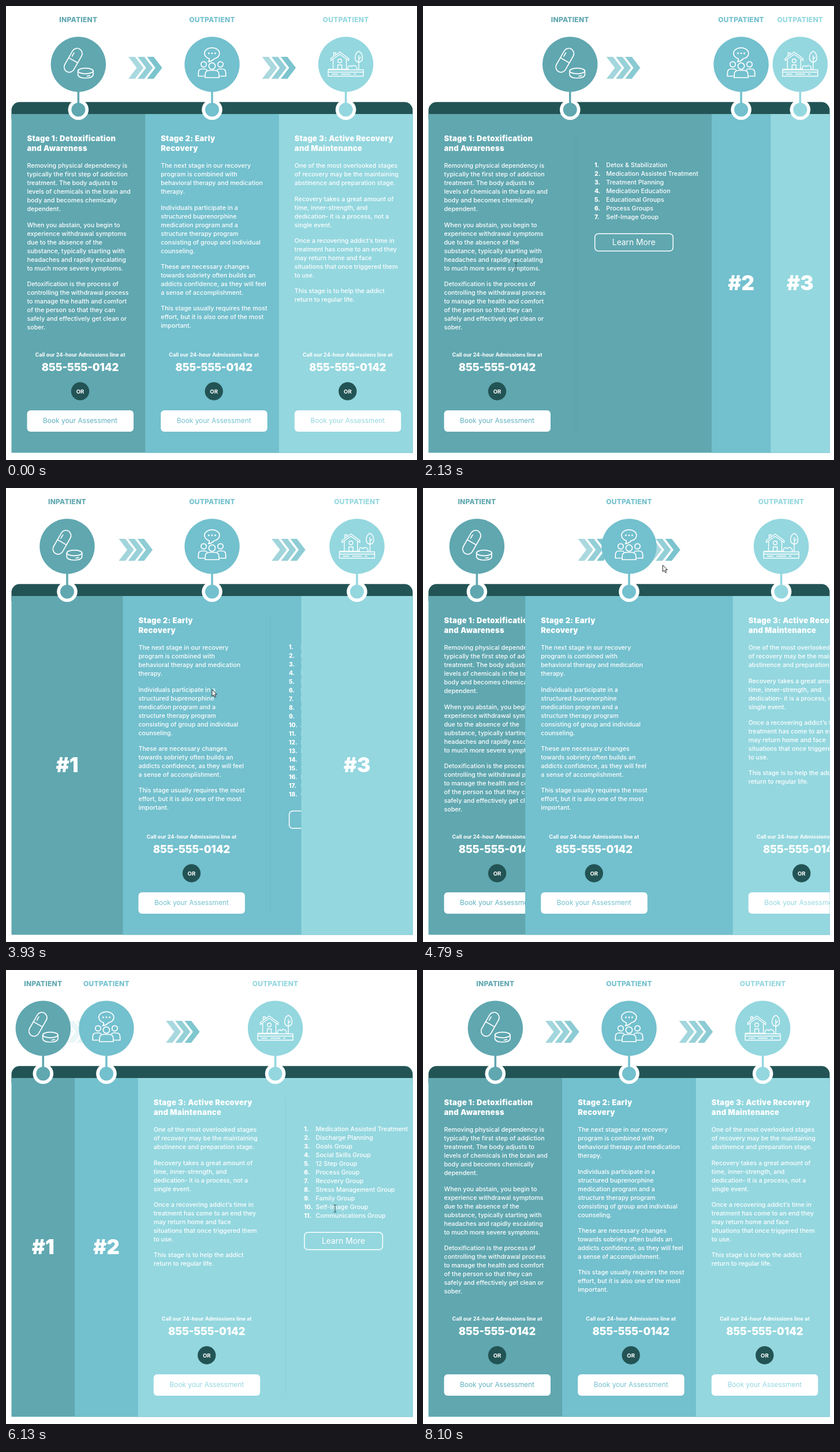
An HTML page with a canvas that plays this animation: 712 by 786 pixels, repeating every 8180 ms.

```html
<!DOCTYPE html>
<html lang="en">
<head>
<meta charset="utf-8">
<title>Recovery stages</title>
<style>
html, body { margin: 0; width: 100%; height: 100%; overflow: hidden; background: #fff; }
canvas { display: block; width: 712px; height: 786px; }
</style>
</head>
<body>
<canvas id="stage"></canvas>
<script>
const LOOP = 8180, LEFT = 9.5, WIDTH = 695, TOP = 187, BOTTOM = 773.5;
const DARK = '#235455', WHITE = '#fff', CHEVRON = '#76c2cc';
const FONT = 'Inter, "Open Sans", sans-serif';
const PHONE = '855-555-0142';

const columns = [
  {
    label: 'INPATIENT', color: '#60a7b0', link: '#60b1bf', icon: drawPills,
    title: ['Stage 1: Detoxification', 'and Awareness'],
    text: [
      ['Removing physical dependency is', 'typically the first step of addiction', 'treatment. The body adjusts to',
        'levels of chemicals in the brain and', 'body and becomes chemically', 'dependent.'],
      ['When you abstain, you begin to', 'experience withdrawal symptoms', 'due to the absence of the',
        'substance, typically starting with', 'headaches and rapidly escalating', 'to much more severe symptoms.'],
      ['Detoxification is the process of', 'controlling the withdrawal process', 'to manage the health and comfort',
        'of the person so that they can', 'safely and effectively get clean or', 'sober.']
    ],
    list: ['Detox & Stabilization', 'Medication Assisted Treatment', 'Treatment Planning', 'Medication Education',
      'Educational Groups', 'Process Groups', 'Self-Image Group']
  },
  {
    label: 'OUTPATIENT', color: '#73c0ce', link: '#73c0ce', icon: drawGroup,
    title: ['Stage 2: Early', 'Recovery'],
    text: [
      ['The next stage in our recovery', 'program is combined with', 'behavioral therapy and medication', 'therapy.'],
      ['Individuals participate in a', 'structured buprenorphine', 'medication program and a',
        'structure therapy program', 'consisting of group and individual', 'counseling.'],
      ['These are necessary changes', 'towards sobriety often builds an', 'addicts confidence, as they will feel',
        'a sense of accomplishment.'],
      ['This stage usually requires the most', 'effort, but it is also one of the most', 'important.']
    ],
    list: ['Medication Assisted Treatment', 'Individual Therapy', 'Treatment Planning', 'Medication Education',
      'Educational Groups', 'Process Group', 'Relapse Prevention', 'Coping Skills Group', 'Social Skills Group',
      'Anger Management', 'Stress Management Group', 'Family Group', 'Life Skills Group', 'Self-Image Group',
      '12 Step Group', 'Recovery Group', 'Goals Group', 'Communications Group']
  },
  {
    label: 'OUTPATIENT', color: '#94d7df', link: '#94d7df', icon: drawHouse,
    title: ['Stage 3: Active Recovery', 'and Maintenance'],
    text: [
      ['One of the most overlooked stages', 'of recovery may be the maintaining', 'abstinence and preparation stage.'],
      ['Recovery takes a great amount of', 'time, inner-strength, and', 'dedication- it is a process, not a', 'single event.'],
      ['Once a recovering addict\u2019s time in', 'treatment has come to an end they', 'may return home and face',
        'situations that once triggered them', 'to use.'],
      ['This stage is to help the addict', 'return to regular life.']
    ],
    list: ['Medication Assisted Treatment', 'Discharge Planning', 'Goals Group', 'Social Skills Group',
      '12 Step Group', 'Process Group', 'Recovery Group', 'Stress Management Group', 'Family Group',
      'Self-Image Group', 'Communications Group']
  }
];

// Open column (0 = none), with the start and the lengths of both transitions
const changes = [
  { at: -2000, open: 0 }, { at: 850, open: 1 }, { at: 2650, open: 0 }, { at: 3818, open: 2 },
  { at: 4625, open: 0 }, { at: 5736, open: 3 }, { at: 7700, open: 0, grow: 330, slide: 370 }
];
const arrowShift = [[0, 0], [-153, 0], [153, -153], [0, 153]];
const arrowAlpha = [[1, 1], [1, 0], [1, 1], [0, 1]];

// Pointer path: time, x, y
const pointer = [
  [860, 12, 300], [1150, 90, 390], [1700, 142, 440], [2130, 161, 451], [2510, 152, 400], [2650, 172, 170],
  [2970, 244, 55], [3400, 300, 70], [3800, 350, 190], [3930, 357, 349], [4400, 362, 372], [4620, 395, 165],
  [5000, 440, 95], [5330, 447, 91], [5500, 462, 110], [5730, 530, 200], [6130, 570, 413], [6600, 578, 425],
  [7000, 600, 480], [7350, 630, 300], [7690, 618, 80], [7800, 614, 6]
];

const canvas = document.getElementById('stage');
const ctx = canvas.getContext('2d');
const ratio = window.devicePixelRatio || 1;
canvas.width = 712 * ratio;
canvas.height = 786 * ratio;

const mix = (a, b, k) => a + (b - a) * k;
const clamp = v => Math.min(1, Math.max(0, v));

// CSS "ease": cubic-bezier(.25, .1, .25, 1)
function ease(x) {
  if (x <= 0 || x >= 1) return clamp(x);
  const curve = (a, b, s) => 3 * a * s * (1 - s) ** 2 + 3 * b * s * s * (1 - s) + s ** 3;
  let lo = 0, hi = 1;
  for (let i = 0; i < 24; i++) {
    const mid = (lo + hi) / 2;
    if (curve(.25, .25, mid) < x) lo = mid; else hi = mid;
  }
  return curve(.1, 1, lo);
}

function write(str, x, y, size, weight, color = WHITE, align = 'left', spacing = 0) {
  ctx.font = `${weight} ${size}px ${FONT}`;
  ctx.letterSpacing = spacing + 'px';
  ctx.textAlign = align;
  ctx.fillStyle = color;
  ctx.fillText(str, x, y);
}

function disc(x, y, r, color) {
  ctx.fillStyle = color;
  ctx.beginPath();
  ctx.arc(x, y, r, 0, Math.PI * 2);
  ctx.fill();
}

function box(x, y, w, h, r) {
  ctx.beginPath();
  ctx.roundRect(x, y, w, h, r);
}

function ring(x, y, rx, ry = rx) {
  ctx.beginPath();
  ctx.ellipse(x, y, rx, ry, 0, 0, Math.PI * 2);
  ctx.stroke();
}

const line = path => ctx.stroke(new Path2D(path));

function drawPills() {
  ctx.save();
  ctx.translate(-9, -7);
  ctx.rotate(.52);
  box(-9, -22.5, 18, 45, 9);
  ctx.stroke();
  line('M-9 0H9M-5 -12V-5');
  ctx.restore();
  ring(12.5, 11.5, 13.2, 4.8);
  line('M-.7 11.5V18.5C1 25.5 24 25.5 25.7 18.5V11.5M15 20.5L20 19.3');
}

function drawGroup() {
  line('M-5 -10A13 9.7 0 1 1 4 -9.8Q0 -5.5 -6.5 -4.3Q-4 -7 -5 -10Z');
  for (const x of [-5.5, 0, 5.5]) disc(x, -19, 1.4, WHITE);
  ring(0, 3, 5.6);
  line('M-12 23V18Q-12 10.5 -5 10.5H5Q12 10.5 12 18V23Z');
  for (const side of [-1, 1]) {
    ctx.save();
    ctx.scale(side, 1);
    ring(14.5, 0, 4.7);
    line('M14 20.5H23.7V14.5Q23.7 8 17 8H13Q10.5 8 9 9.5');
    ctx.restore();
  }
}

function drawHouse() {
  ctx.lineWidth = 1.4;
  line('M-26 -10L-10.5 -21.5L5 -10V-6.5L-10.5 -17.5L-26 -6.5ZM-22 -8.5V8.5M1 -8.5V8.5M-21 -14V-20H-17.5V-16.5');
  ring(-10.5, -6, 3.3);
  line('M-14 8.5V1H-7V8.5M-30 8.5H4');
  line('M4 8.5C3 2 8 1 10 4C14 0 20 3 19 8.5');
  line('M22.5 -22.5C29 -20 33 -6 22.5 -3.5C12 -6 16 -20 22.5 -22.5ZM22.5 -15V8.5M22.5 -9L26 -12.5');
  ctx.strokeRect(-30.5, 9.5, 61, 11);
  line('M-30 13.5H30M-24 17H-14M-8 17H8M14 17H17');
}

function drawChevrons(cx, alpha, t) {
  const glow = .5 + .5 * Math.cos(t / 1200 * Math.PI * 2);
  ctx.save();
  ctx.translate(cx - 29.2, 88);
  ctx.fillStyle = CHEVRON;
  [-.1, .06, .24].forEach((gain, i) => {
    ctx.globalAlpha = alpha * (.72 + gain * glow);
    ctx.fill(new Path2D('M0 0H11.5L26.2 19L11.5 38H0L14.5 19Z'));
    ctx.translate(16.2, 0);
  });
  ctx.restore();
}

function drawHead(col, cx) {
  disc(cx, 101, 47.7, col.color);
  disc(cx, 179.5, 17.8, WHITE);
  ctx.fillStyle = col.color;
  ctx.fillRect(cx - 1.8, 146, 3.6, 24);
  disc(cx, 179.5, 12, col.color);
  write(col.label, cx, 28.4, 12, 800, col.color, 'center', .25);
  ctx.save();
  ctx.translate(cx, 101);
  ctx.strokeStyle = WHITE;
  ctx.lineWidth = 1.7;
  ctx.lineJoin = ctx.lineCap = 'round';
  col.icon();
  ctx.restore();
}

function drawCopy(col, left) {
  const x = left + 27, mid = left + 119;
  col.title.forEach((row, i) => write(row, x, 234 + i * 17, 13, 900, WHITE, 'left', .3));
  let y = 280.2;
  for (const block of col.text) {
    for (const row of block) {
      write(row, x, y, 10.7, 500);
      y += 15;
    }
    y += 12.3;
  }
  write('Call our 24-hour Admissions line at', mid, 607.3, 9.1, 700, WHITE, 'center');
  write(PHONE, mid, 631.8, 18.1, 900, WHITE, 'center');
  disc(mid, 667, 15.7, DARK);
  write('OR', mid, 670.5, 9.6, 700, WHITE, 'center');
  ctx.fillStyle = WHITE;
  box(x, 700, 184.5, 37, 6);
  ctx.fill();
  write('Book your Assessment', mid, 722.3, 11.9, 400, col.link, 'center');
}

function drawList(col, left) {
  const x = left + 287.5;
  ctx.fillStyle = 'rgba(20, 80, 90, .06)';
  ctx.fillRect(left + 255, 220, 1, 517);
  col.list.forEach((item, i) => {
    const y = 279 + i * 15;
    write(i + 1 + '.', x, y, 10.4, 800);
    write(item, x + 20.3, y, 10.75, 500);
  });
  const top = 304.2 + (col.list.length - 1) * 15;
  ctx.strokeStyle = WHITE;
  ctx.lineWidth = 1.5;
  box(x + .7, top, 135.5, 30, 6);
  ctx.stroke();
  write('Learn More', x + 68.3, top + 20, 13.8, 400, WHITE, 'center');
}

function drawPointer(t, beamReady) {
  const i = pointer.findIndex(p => p[0] > t);
  if (i < 1) return;
  const [a, b] = [pointer[i - 1], pointer[i]];
  const k = (t - a[0]) / (b[0] - a[0]);
  const y = mix(a[2], b[2], k);
  ctx.save();
  ctx.translate(mix(a[1], b[1], k), y);
  ctx.lineWidth = 1;
  if (beamReady && y > 215) {
    ctx.strokeStyle = '#35565a';
    line('M-2.5 -6H2.5M0 -6V6M-2.5 6H2.5');
  } else {
    ctx.strokeStyle = '#222';
    ctx.fillStyle = WHITE;
    const shape = new Path2D('M0 0V11.5L2.7 9L4.6 13.2L6.5 12.4L4.7 8.2H8.2Z');
    ctx.fill(shape);
    ctx.stroke(shape);
  }
  ctx.restore();
}

function columnWidth(open, i) {
  if (!open) return WIDTH / 3;
  return open === i + 1 ? 490.5 : 102.25;
}

function draw(t) {
  ctx.setTransform(ratio, 0, 0, ratio, 0, 0);
  ctx.fillStyle = WHITE;
  ctx.fillRect(0, 0, 712, 786);

  const index = changes.findLastIndex(c => c.at <= t);
  const { at, open, grow = 560, slide = 780 } = changes[index];
  const before = index ? changes[index - 1].open : 0;
  const grown = ease((t - at) / grow);
  const slid = clamp((t - at) / slide);

  let edge = LEFT;
  const spans = columns.map((col, i) => {
    const w = mix(columnWidth(before, i), columnWidth(open, i), grown);
    const span = { left: edge, w, mid: edge + w / 2 };
    edge += w;
    return span;
  });

  ctx.fillStyle = DARK;
  box(LEFT, 166.3, WIDTH, 30, [14, 14, 0, 0]);
  ctx.fill();

  // Each fill runs to the right end, so no seam shows between columns
  columns.forEach((col, i) => {
    const { left, w, mid } = spans[i];
    ctx.fillStyle = col.color;
    ctx.fillRect(left, TOP, LEFT + WIDTH - left, BOTTOM - TOP);
    ctx.save();
    ctx.beginPath();
    ctx.rect(left, TOP, w, BOTTOM - TOP);
    ctx.clip();
    if (!open || open === i + 1) drawCopy(col, left);
    else write('#' + (i + 1), mid, 492, 35, 900, WHITE, 'center');
    if (open === i + 1) drawList(col, left);
    ctx.restore();
  });

  for (const i of [0, 1]) {
    const shift = mix(arrowShift[before][i], arrowShift[open][i], slid);
    const alpha = mix(arrowAlpha[before][i], arrowAlpha[open][i], ease(slid));
    drawChevrons(spans[i + 1].left + shift, alpha, t);
  }
  columns.forEach((col, i) => drawHead(col, spans[i].mid));
  drawPointer(t, open > 0 && t - at > 250);
}

const start = performance.now();
function tick() {
  draw((performance.now() - start) % LOOP);
  requestAnimationFrame(tick);
}
tick();
</script>
</body>
</html>
```
